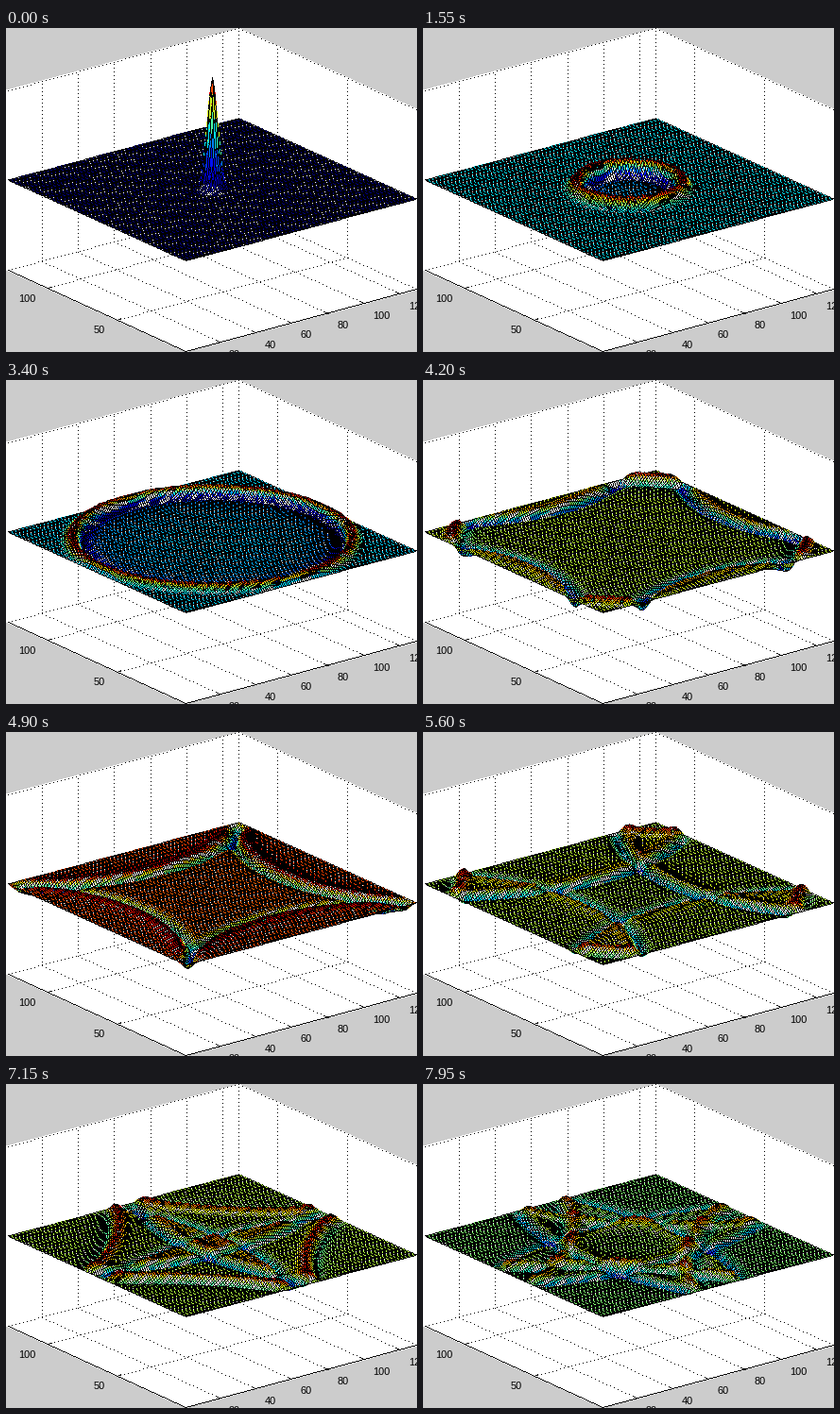
These frames come from a looping animation (435x343 px, 8000 ms). A matplotlib script:

```python
import numpy as np
import matplotlib
import matplotlib.pyplot as plt
from matplotlib.animation import FuncAnimation
from matplotlib.patches import Polygon

W, H, DPI = 435, 343, 64
N = 128                              # cells per side
EX = np.array([244, -65.5]) / N      # one cell along x, in pixels
EY = np.array([-188, -85.5]) / N     # one cell along y
ORIGIN = np.array([190, 246])        # front corner of the still surface
DOWN, UP = np.array([0, 96]), np.array([0, -95])
PEAK, SIGMA, SPEED = 118, 2.2, 1.025
FRAMES, STEP_MS, HOLD = 160, 50, 9
BLACK = 1

# Standing modes of a square membrane held at its rim
k = np.arange(1, N)
node = np.arange(N + 1)
modes = np.sin(np.pi * np.outer(node, k) / N)
drop = np.exp(-(node - N / 2) ** 2 / (2 * SIGMA ** 2))
coef = 2 / N * modes.T @ drop
weight = np.outer(coef, coef)
omega = SPEED * np.pi / N * np.hypot(k[:, None], k)

jet = matplotlib.colormaps["jet"](np.linspace(0, 1, 64))
palette = (np.vstack([[0, 0, 0, 0], [0, 0, 0, 1], jet]) * 255).astype(np.uint8)


def height(t):
    return modes @ (weight * np.cos(omega * t)) @ modes.T


def spread(count):
    """Owner and running number of every item when owner i has count[i] items."""
    owner = np.repeat(np.arange(len(count)), count)
    return owner, np.arange(len(owner)) - np.repeat(np.cumsum(count) - count, count)


def stroke(img, a, b, ink, step=1):
    """One-pixel lines from a to b; later lines cover earlier ones."""
    d = b - a
    size = np.maximum(np.abs(d).max(0), 1)
    owner, i = spread((size // step).astype(int) + 1)
    part = i * step / size[owner]
    x, y = np.floor(a[:, owner] + d[:, owner] * part + 0.5).astype(int)
    x, y = np.clip(x, 0, W - 1), np.clip(y, 0, H - 1)
    img.reshape(-1)[y * W + x] = ink[owner]


def line(img, a, b, step=1):
    ends = [np.rint(np.asarray(p, float)).reshape(2, 1) for p in (a, b)]
    stroke(img, *ends, np.array([BLACK]), step)


def place(x, y):
    return ORIGIN + x * EX + y * EY


def paint(img, u):
    gx, gy = np.meshgrid(node, node, indexing="ij")
    v = np.rint(np.stack([ORIGIN[0] + gx * EX[0] + gy * EY[0],
                          ORIGIN[1] + gx * EX[1] + gy * EY[1] - PEAK * u]))

    def corner(i, j):
        return v[:, i:i + N, j:j + N][:, ::-1, ::-1].reshape(2, -1)

    p00, p10, p01, p11 = corner(0, 0), corner(1, 0), corner(0, 1), corner(1, 1)
    near, far = p10 - p00, p11 - p01
    fills = np.maximum(np.abs(near).max(0), np.abs(far).max(0))
    fills = np.maximum(fills, 1).astype(int)

    # Each face: its fill lines, then four black edges
    count = fills + 4
    face, q = spread(count)
    edge = np.cumsum(count) - 4
    s = (q + 0.5) / fills[face]
    s[edge], s[edge + 1] = 0, 1
    a = p00[:, face] + s * near[:, face]
    b = p01[:, face] + s * far[:, face]
    a[:, edge + 2], b[:, edge + 2] = p00, p10
    a[:, edge + 3], b[:, edge + 3] = p01, p11

    level = (u - u.min()) / (u.max() - u.min())
    shade = 2 + np.minimum((level * 64).astype(int), 63)
    ink = shade[:N, :N][::-1, ::-1].reshape(-1)[face]
    for e in range(4):
        ink[edge + e] = BLACK
    stroke(img, np.rint(a), np.rint(b), ink)


fig = plt.figure(figsize=(W / DPI, H / DPI), dpi=DPI, facecolor="#cccccc")
ax = fig.add_axes([0, 0, 1, 1])
ax.axis("off")

front, left = place(0, 0), place(0, N)
right, back = place(N, 0), place(N, N)
ax.add_patch(Polygon([left + DOWN - [2, 1], front + DOWN, right + DOWN, right + UP,
                      back + UP, left + UP - [2, 0]],
                     fc="white", ec="none", antialiased=False))

backdrop = np.zeros((H, W), np.uint8)
font = dict(family="Liberation Sans", fontsize=11 * 72 / DPI, va="center",
            color="black", clip_on=True)

for x in range(20, 121, 20):
    g, wall = place(x - 1, 0) + DOWN, place(x - 1, N)
    line(backdrop, g, wall + DOWN, 4)
    line(backdrop, wall + DOWN, wall + UP, 4)
    line(backdrop, g, g + 3 * EY)
    ax.text(g[0] + 9, g[1] + 13, str(x), ha="left", **font)

for y in (50, 100):
    g, wall = place(0, y) + DOWN, place(N, y)
    line(backdrop, g, wall + DOWN, 4)
    line(backdrop, wall + DOWN, wall + UP, 4)
    line(backdrop, g, g + 2.5 * EX)
    ax.text(g[0] - 12.5, g[1] + 11, str(y), ha="right", **font)

line(backdrop, back + DOWN, back + UP, 4)
for side in (left, right):
    for shift in (DOWN, UP):
        line(backdrop, back + shift, side + shift, 4)
    line(backdrop, front + DOWN, side + DOWN)

view = ax.imshow(palette[backdrop], interpolation="nearest", aspect="auto", zorder=2)
ax.set_xlim(-0.5, W - 0.5)
ax.set_ylim(H - 0.5, -0.5)


def draw(i):
    img = backdrop.copy()
    paint(img, height(max(0, i - HOLD)))
    view.set_data(palette[img])
    return [view]


anim = FuncAnimation(fig, draw, frames=FRAMES, interval=STEP_MS,
                     repeat=True, repeat_delay=0, blit=False)
plt.show()
```
